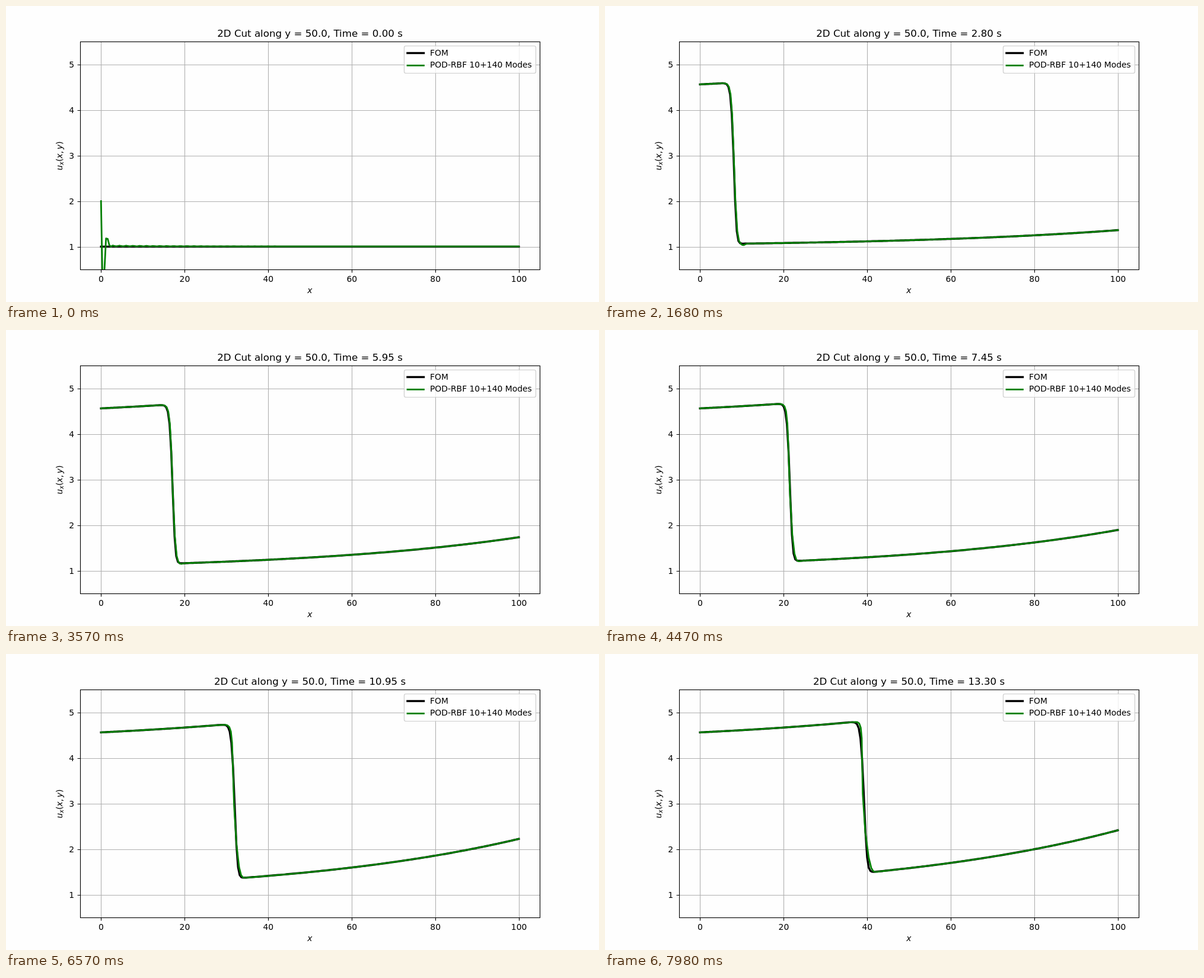
Write an HTML page that moves like this. It is 1000 by 500 pixels and loops after 8000 ms.

```html
<!DOCTYPE html>
<html lang="en">
<head>
<meta charset="utf-8">
<title>2D cut</title>
<style>
  html, body { margin: 0; width: 100%; height: 100%; overflow: hidden; background: #fefefe; }
  svg { display: block; width: 1000px; height: 500px; }
  text { font: 13.89px "DejaVu Sans", sans-serif; fill: #000; }
  .mid { text-anchor: middle; }
  .end { text-anchor: end; }
  .it { font-style: oblique; }
  .sub { font-size: 9.72px; }
  #title { font-size: 16.67px; }
  .line { fill: none; stroke-linecap: square; stroke-linejoin: round; }
  .fom { stroke: #000; stroke-width: 3.47; }
  .rom { stroke: #008000; stroke-width: 2.78; }
</style>
</head>
<body>
<svg viewBox="0 0 1000 500">
  <clipPath id="area"><rect x="125" y="60" width="775" height="385"/></clipPath>
  <path id="grid" stroke="#b0b0b0" stroke-width="1.11"/>
  <g clip-path="url(#area)">
    <path id="fom" class="line fom"/>
    <path id="rom" class="line rom"/>
  </g>
  <path id="ticks" stroke="#000" stroke-width="1.11"/>
  <rect x="125.5" y="60.5" width="775" height="385" fill="none" stroke="#000" stroke-width="1.11"/>
  <g id="labels"></g>
  <text id="title" class="mid" x="512.5" y="52"></text>
  <text class="mid it" x="512.3" y="485">x</text>
  <text class="mid" transform="translate(95 253) rotate(-90)"><tspan class="it">u</tspan><tspan class="it sub" dy="2.2">x</tspan><tspan dy="-2.2">(</tspan><tspan class="it">x</tspan>,<tspan class="it" dx="2.6">y</tspan>)</text>
  <rect x="671.5" y="67.5" width="222" height="46" rx="2.8" fill="#fff" fill-opacity=".8" stroke="#ccc" stroke-width="1.2"/>
  <path class="line fom" d="M677 79.5H704.5"/>
  <path class="line rom" d="M677 100.5H704.5"/>
  <text x="715" y="84">FOM</text>
  <text x="715" y="104">POD-RBF 10+140 Modes</text>
</svg>
<script>
const $ = id => document.getElementById(id);
const N = 250, STEPS = 266, DT = 0.05, DX = 0.4, INFLOW = 4.56;
const px = x => 160.23 + x * 7.0455;
const py = u => 445 - (u - 0.5) * 77;
const snap = v => Math.floor(v + 0.5) + 0.5;
const nodeX = i => i * DX;

// Burgers equation with an exponential source: upwind in space, trapezoidal in time
function solve() {
  const a = DT / DX / 4;
  const all = [new Array(N + 1).fill(1)];
  for (let n = 0; n < STEPS; n++) {
    const old = all[n], now = [INFLOW];
    for (let i = 1; i <= N; i++) {
      const left = i > 1 ? old[i - 1] : INFLOW;
      const force = DT * 0.02 * Math.exp(0.019 * nodeX(i));
      const rhs = old[i] + force + a * (left ** 2 + now[i - 1] ** 2 - old[i] ** 2);
      now.push((Math.sqrt(1 + 4 * a * rhs) - 1) / (2 * a));
    }
    all.push(now);
  }
  return all;
}
const states = solve();

// Reduced model error: time, shift at mid front, shift at the knees, undershoot, overshoot
const errors = [
  [0, 0, 0, 0.05, 0],
  [2.8, 0.05, 0.15, 0.035, 0],
  [4.5, 0.15, 0.3, 0, 0],
  [5.95, 0, 0.15, 0.015, 0],
  [8.95, -0.12, 0.4, 0.01, 0],
  [10.95, -0.15, 0.4, 0, 0],
  [13.3, -0.25, 0.7, 0, 0.02]
];
function errorAt(t) {
  let k = 0;
  while (k < errors.length - 2 && t > errors[k + 1][0]) k++;
  const [p, q] = [errors[k], errors[k + 1]];
  const f = (t - p[0]) / (q[0] - p[0]);
  return p.map((v, j) => v + (q[j] - v) * f);
}

const bump = (d, w) => Math.exp(-((d / w) ** 2));
const head = [1, -1, -0.55, 0.18, 0.17, 0.03, 0];
function ringing(i, t) {
  const x = nodeX(i);
  const tail = 0.004 + 0.012 * Math.exp(-x / 18) * (1 + Math.cos(2 * Math.PI * (x - 2.8) / 1.62));
  return (i < head.length ? head[i] : tail) * Math.exp(-t / 0.08);
}

function reduced(u, t) {
  const [, mid, knee, under, over] = errorAt(t);
  const hi = Math.max(...u.slice(0, 120)), lo = Math.min(...u);
  const jump = hi - lo;
  const front = nodeX(u.findIndex(v => v < (hi + lo) / 2));
  return u.map((v, i) => {
    let x = nodeX(i), y = v + ringing(i, t);
    if (jump > 0.5) {
      const q = Math.min(1, Math.max(0, (v - lo) / jump));
      const d = x - front;
      x += (mid + (knee - mid) * (2 * q - 1) ** 2) * bump(d, 4) * Math.min(1, x / 2);
      y += over * bump(d + 2, 0.8) - under * bump(d - 1.8, 0.6);
    }
    return [x, y];
  });
}

const toPath = pts => "M" + pts.map(([x, y]) => px(x).toFixed(2) + " " + py(y).toFixed(2)).join("L");

function drawAxes() {
  let grid = "", ticks = "", labels = "";
  for (let v = 0; v <= 100; v += 20) {
    const x = snap(px(v));
    grid += `M${x} 60V445`;
    ticks += `M${x} 445.5v4.9`;
    labels += `<text class="mid" x="${px(v) + 0.3}" y="466">${v}</text>`;
  }
  for (let v = 1; v <= 5; v++) {
    const y = snap(py(v));
    grid += `M125 ${y}H900`;
    ticks += `M125.5 ${y}h-4.9`;
    labels += `<text class="end" x="115" y="${y + 4.5}">${v}</text>`;
  }
  $("grid").setAttribute("d", grid);
  $("ticks").setAttribute("d", ticks);
  $("labels").innerHTML = labels;
}

let shown = -1;
function draw(ms) {
  const n = Math.min(STEPS, Math.floor((ms % 8000) / 30));
  if (n === shown) return;
  shown = n;
  const u = states[n], t = n * DT;
  $("title").textContent = `2D Cut along y = 50.0, Time = ${t.toFixed(2)} s`;
  $("fom").setAttribute("d", toPath(u.map((v, i) => [nodeX(i), v])));
  $("rom").setAttribute("d", toPath(reduced(u, t)));
}

drawAxes();
const start = performance.now();
function tick() {
  draw(performance.now() - start);
  requestAnimationFrame(tick);
}
tick();
</script>
</body>
</html>
```
